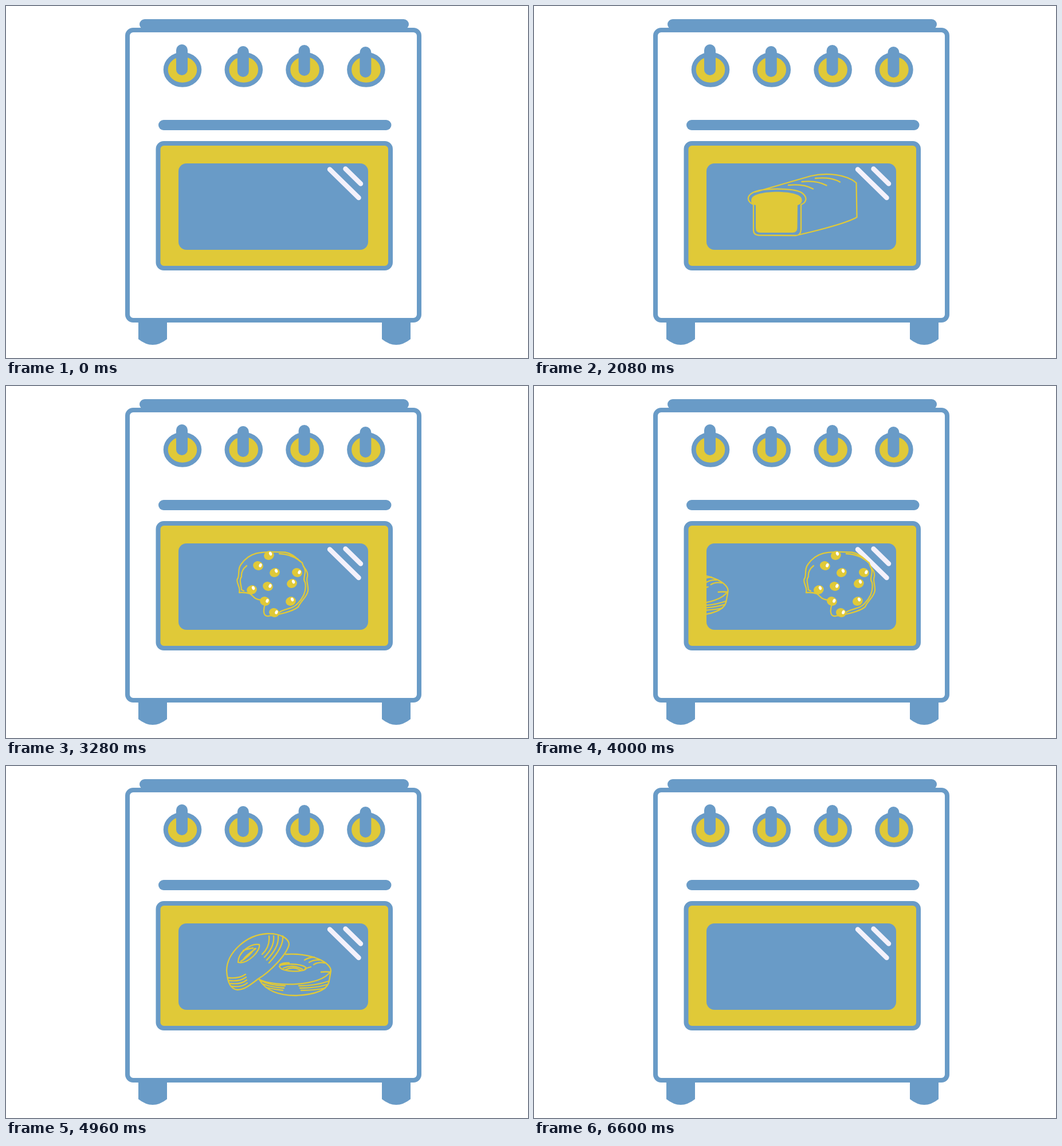
Recreate the animation shown at these times as an HTML page. Size 911 px wide and 615 px high, loop 6.72 s.

```html
<!DOCTYPE html>
<html lang="en">
<head>
<meta charset="utf-8">
<title>Oven</title>
<style>
  html, body { margin: 0; width: 100%; height: 100%; overflow: hidden; background: #fff; }
  svg { display: block; }
  .blue { fill: #699bc7; }
  .yellow { fill: #e0c938; }
  .frame { stroke: #699bc7; stroke-width: 8; }
  .line { fill: none; stroke: #e0c938; stroke-width: 2.3; stroke-linecap: round; stroke-linejoin: round; }
</style>
</head>
<body>
<svg width="911" height="615" viewBox="0 0 911 615">
  <defs>
    <clipPath id="glass"><rect x="301" y="275" width="328" height="151"/></clipPath>
  </defs>

  <rect class="blue" x="233" y="23" width="470" height="18" rx="9"/>
  <path class="blue" d="M231 548V582Q256 602 281 582V548ZM656 548V582Q681 602 706 582V548Z"/>
  <rect class="frame" x="212" y="42" width="509" height="507" rx="10" fill="#fff"/>
  <g id="knobs"></g>
  <rect class="blue" x="266" y="199" width="406.5" height="18" rx="9"/>
  <rect class="frame yellow" x="265.5" y="240" width="405.5" height="218" rx="10"/>
  <rect class="blue" x="301" y="275" width="331" height="151" rx="14"/>
  <path d="M565 285.5L615.5 335M592.5 284.5L619 310.5" stroke="#f3f1fb" stroke-width="8.5" stroke-linecap="round"/>

  <g clip-path="url(#glass)">
    <g id="bread">
      <path class="yellow" d="M387 348C377 346 379 339 380 336C386 321 462 321 467 336C469 342 466 346 460 348L459.5 388Q459 396 451 396H395Q387 396 387 388Z"/>
      <path class="line" d="M383 347C371 341 371 332 382 326C398 317.5 452 317.5 467 326C478 334 476 343 466 347V391Q465 401 457 401L392 400.5Q383 400 383 392Z
        M386 325L483 297C512 290 547 295 562.5 309L563.5 369C548 378 500 391 461 400"/>
      <path class="line" id="slashes"/>
    </g>

    <g id="cookie">
      <path class="line" d="M475 361C478 351 470 346 471.5 338C477 331 471 321 478 312C492 291 510 288 555 290.5C569 293 575 301 585 309
        C587 319 596 322 594 333C591 340 596 347 595 358C593 369 582 376 578 386C567 395 543 399 526 402C516 403 517 391 520 381C513 381 513 379 513 374C500 372 501 368 494 363Q485 360 475 361Z
        M545 293Q568 294 582 307M587 315C595 325 584 337 590 343C593 358 587 370 577 380C568 391 552 388 543 397
        M488 314Q478 322 479 333C474 340 479 348 479 356L483 358"/>
      <g id="chips"></g>
    </g>

    <g id="donuts" class="line">
      <path d="M385 357C386 325 420 295 455 293C480 292 494 302 494 312C490 329 462 359 440 372C422 386 414 391 404 391C391 390 386 375 385 357Z
        M405 343C405 326 427 309 442 312C445 322 422 347 405 343ZM414 322Q425 319 431 318"/>
      <path d="M488 329C530 326 567 342 567 358C551 386 468 386 442 373C453 393 478 401 504 401C540 400 562 391 564 375L567 358
        M477 350C480 344 519 345 524 353C523 361 480 361 477 350ZM478 347Q484 343 494 344M522 354L532 351M550 360Q558 359 566 360"/>
      <path id="stripes"/>
    </g>
  </g>
</svg>
<script>
const byId = id => document.getElementById(id);
const repeat = (count, make) => Array.from({ length: count }, (_, i) => make(i)).join('');

byId('knobs').innerHTML = repeat(4, i => {
  const x = 308 + 106.8 * i, top = 67 + i % 2 * 3 + (i >> 1);
  return `<ellipse class="frame yellow" cx="${x}" cy="111.2" rx="29.3" ry="26.5"/>
    <rect class="blue" x="${x - 11}" y="${top}" width="20" height="54" rx="10"/>`;
});

byId('slashes').setAttribute('d', repeat(3, i =>
  `M${444 + 23.5 * i} ${313 - 6 * i}q26 -3 43 6.5`));

byId('stripes').setAttribute('d',
  repeat(4, i => `M${459 + 8 * i} 297Q${461 + 8 * i} 316 ${447 + 4 * i} ${329 + 5 * i}`) +
  repeat(4, i => `M${388 + 2 * i} ${370 + 5 * i}q18 2 ${30 - i} -6`) +
  repeat(3, i => `M${410 + 2 * i} ${341 - i}Q${423 - 4 * i} 334 ${434 + i} 319`) +
  repeat(2, i => `M${484 + 4 * i} ${353 + 3 * i}Q502 ${346 + 3 * i} ${517 - 3 * i} ${355 + 2 * i}`) +
  repeat(3, i => `M${521 + 8 * i} ${339 + 4 * i}q8 -5 ${17 + i} ${i - 5}`) +
  repeat(3, i => `M${444 + 5 * i} ${375 + 6 * i}Q${463 + 2 * i} ${384 + 3 * i} ${487 - 2 * i} ${384 + 4 * i}`) +
  repeat(3, i => `M${511 + 2 * i} ${384 + 4 * i}Q540 ${384 + 4 * i} ${563 - 3 * i} ${376 + 6 * i}`));

const chips = '527,296 508,314 537,326 576,326 567,345 525,350 497,356 520,376 565,376 536,396'.split(' ');
byId('chips').innerHTML = chips.map((spot, i) =>
  `<g transform="translate(${spot}) rotate(${-20 + 40 * (i % 2)})">
    <ellipse class="yellow" rx="9" ry="7.8"/><ellipse cx="3.5" cy="-2" rx="2.5" ry="3.5" fill="#fff"/>
  </g>`).join('');

// Times in seconds; enter and leave set the speed in px per second
const items = {
  bread: { enter: 188, arrive: 1.96, depart: 2.08, leave: 226 },
  cookie: { enter: 316, arrive: 3.28, depart: 3.68, leave: 212 },
  donuts: { enter: 239, arrive: 4.96, depart: 5.4, leave: 210 }
};
const REST_SHIFT = { bread: 0, cookie: -68, donuts: 0 };
const LOOP = 6720, STEP = 40;

// Slides in from the left while slowing slightly, waits, then leaves to the right
const slide = ({ enter, arrive, depart, leave }, t) =>
  leave * Math.max(0, t - depart) - enter * Math.max(0, arrive - t) ** 1.12;

const start = performance.now();
function draw() {
  const t = Math.floor((performance.now() - start) % LOOP / STEP) * STEP / 1000;
  for (const id in items) {
    const x = REST_SHIFT[id] + slide(items[id], t);
    byId(id).setAttribute('transform', `translate(${x.toFixed(2)} 0)`);
  }
  requestAnimationFrame(draw);
}
draw();
</script>
</body>
</html>
```
